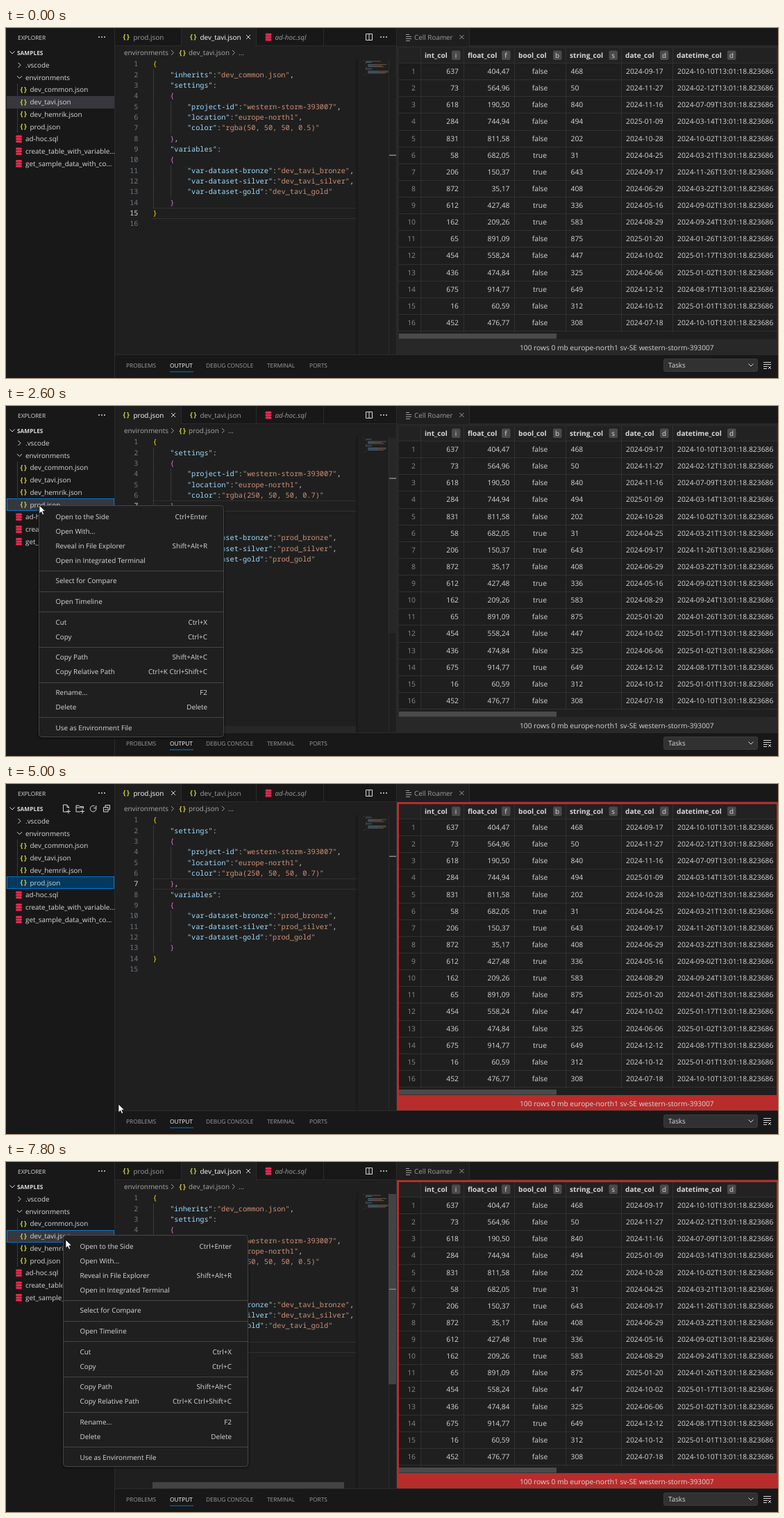
Write an HTML page that moves like this. It is 1112x504 px and loops after 8000 ms.

```html
<!DOCTYPE html>
<html lang="en">
<head>
<meta charset="utf-8">
<title>Environment switcher</title>
<style>
  html, body { margin: 0; width: 100%; height: 100%; overflow: hidden; background: #181818; }
  svg { display: block; font: 9.9px 'Open Sans', 'Noto Sans', sans-serif; text-rendering: geometricPrecision; }
  .code { font: 10.27px 'Noto Sans Mono', 'DejaVu Sans Mono', monospace; }
  .grid { font-size: 10.3px; }
  .head { font-size: 10.1px; font-weight: 700; }
  .caps { font-size: 8.35px; }
  .bold { font-weight: 700; }
  .end { text-anchor: end; }
  .mid { text-anchor: middle; }
</style>
</head>
<body>
<svg id="stage" width="1112" height="504" viewBox="0 0 1112 504"></svg>
<script>
const stage = document.getElementById('stage');
const LOOP = 8000, STEP = 200;
const FG = '#d8d8d8', DIM = '#9d9d9d', BLUE = '#0078d4', LINE = '#2b2b2b', EDITOR = '#1f1f1f';
const YELLOW = '#cbcb41', RED = '#f0284f';

// Drawing helpers; y is the vertical middle of a text line.
const text = (x, y, s, fill = FG, cls = '', extra = '') =>
  `<text x="${x}" y="${y + 3.6}" fill="${fill}" class="${cls}" ${extra}>${s}</text>`;
const rect = (x, y, w, h, fill, extra = '') =>
  `<rect x="${x}" y="${y}" width="${w}" height="${h}" fill="${fill}" ${extra}/>`;
const path = (d, stroke = FG, extra = '') => `<path d="${d}" fill="none" stroke="${stroke}" ${extra}/>`;
const group = (opacity, body) => opacity > 0 ? `<g opacity="${opacity}">${body}</g>` : '';
const right = (x, y, c) => path(`M${x - 2} ${y - 3.5}l3.5 3.5l-3.5 3.5`, c);
const down = (x, y, c) => path(`M${x - 3.5} ${y - 2}l3.5 3.5l3.5 -3.5`, c);
const cross = (x, y, c) => path(`M${x - 3} ${y - 3}l6 6m0 -6l-6 6`, c);
const braces = (x, y) => text(x, y - .5, '{}', YELLOW, 'bold', 'letter-spacing="1.6"');
const dots = (x, y) => [-4, 0, 4].map(d => `<circle cx="${x + d}" cy="${y}" r="1" fill="${FG}"/>`).join('');
const database = (x, y) => [-5.2, -1.5, 2.2].map(d => rect(x - 4.5, y + d, 9, 3.2, RED, 'rx="1.5"')).join('');

// Piecewise linear track of [time, ...values].
function track(keys, t) {
  if (t <= keys[0][0]) return keys[0].slice(1);
  const i = keys.findIndex(k => k[0] > t);
  if (i < 0) return keys[keys.length - 1].slice(1);
  const a = keys[i - 1], b = keys[i], f = (t - a[0]) / (b[0] - a[0]);
  return a.slice(1).map((v, j) => v + (b[j + 1] - v) * f);
}

const CURSOR = [[800, 6, 118], [1000, 30, 135], [1200, 48, 143], [2600, 48, 143], [2800, 70, 230],
  [3000, 100, 350], [3200, 130, 435], [3600, 162, 461], [5400, 162, 461], [5600, 190, 330],
  [5800, 140, 198], [6000, 106, 177], [6200, 92, 140], [6400, 86, 112], [6600, 84, 105],
  [7400, 84, 105], [7600, 86, 112]];
const SCROLLBARS = [[1400, 0], [1600, 1], [2000, 1], [2800, 0], [5400, 0], [5600, 1], [6800, 1], [7000, 0], [7200, 1]];
const FOLDS = [[5400, 0], [5600, 1], [6000, 1], [6400, 0]];

// Explorer
const FILES = ['.vscode', 'environments', 'dev_common.json', 'dev_tavi.json', 'dev_hemrik.json', 'prod.json',
  'ad-hoc.sql', 'create_table_with_variable...', 'get_sample_data_with_co...'];
const rowY = i => 53.4 + 17.72 * i;

const fileList = FILES.map((name, i) => {
  const y = rowY(i), nested = i > 1 && i < 6;
  const icon = i == 0 ? right(19.5, y) : i == 1 ? down(19.5, y) : nested ? braces(20.5, y) : database(18.5, y);
  return icon + text(nested ? 34.5 : 28, y, name);
}).join('') + rect(16, 80, 1, 71, '#3a3a3a');

const toolbar =
  path('M89 40h-6.500v-10h5l3 3v2M88 30v3.500h3M90 36.500v6m-3 -3h6') +
  path('M107 40h-6v-9h4l1.500 1.500h5v3M101 34h10M110 36.500v6m-3 -3h6') +
  path('M129.800 34.600A4.300 4.300 0 1 1 127.600 31.800M129.800 31v3.600h-3.600') +
  path('M140.500 33.500h6.500v6.500h-6.500zM143 33v-2.500h6.500v6.500h-2M142 36.800h3.500');

function explorer(t, dev, menu) {
  const focused = t >= 1400 && !menu, fill = focused ? '#04395e' : '#37373d';
  const top = Math.round(rowY(dev ? 3 : 5) - 8.9);
  const [hx, hy] = track(CURSOR, t - STEP);
  const hover = Math.round((hy - rowY(0)) / 17.72);
  let s = rect(0, 0, 156, 504, '#181818') + rect(156, 0, 1, 504, LINE);
  if (t >= 1000 && !menu && hx < 156 && hover < FILES.length) s += rect(0, rowY(hover) - 8.9, 156, 17.7, '#2a2d2e');
  s += rect(1.5, top + .5, 154, 17, fill, `stroke="${t >= 1400 ? BLUE : fill}"`);
  s += text(17, 13, 'EXPLORER', FG, 'caps') + dots(138, 13);
  s += down(9, 35.5) + text(16, 35, 'SAMPLES', FG, 'caps bold');
  return s + fileList + (t >= 800 && !menu ? toolbar : '');
}

// Editor
const source = (name, color, inherits) => [
  [0, '{'], ...inherits, [1, '"settings":'], [1, '{'],
  [2, '"project-id":"western-storm-393007",'], [2, '"location":"europe-north1",'], [2, `"color":"rgba(${color})"`],
  [1, '},'], [1, '"variables":'], [1, '{'],
  [2, `"var-dataset-bronze":"${name}_bronze",`], [2, `"var-dataset-silver":"${name}_silver",`],
  [2, `"var-dataset-gold":"${name}_gold"`], [1, '}'], [0, '}'], [0, '']];

const DOCS = {
  prod: { file: 'prod.json', lines: source('prod', '250, 50, 50, 0.7', []),
    line: 7, mark: 104, slider: 281, width: 293, crumb: 313 },
  dev: { file: 'dev_tavi.json', lines: source('dev_tavi', '50, 50, 50, 0.5', [[1, '"inherits":"dev_common.json",']]),
    line: 15, mark: 183, slider: 274, width: 276, crumb: 328 }
};
const lineY = i => 51.8 + 15.33 * i;
const paint = (s, depth) => s.replace(/"[^"]*"(?=:)|"[^"]*"|[{}]/g, (token, at) => {
  const isKey = s[at + token.length] == ':';
  const fill = token.length == 1 ? ['#ffd700', '#da70d6'][depth] : isKey ? '#9cdcfe' : '#ce9178';
  return `<tspan fill="${fill}">${token}</tspan>`;
});

function editorBody({ file, lines, line, mark, crumb }) {
  const ruleY = Math.round(lineY(line - 1) - 7.7);
  let s = text(170, 35.5, 'environments', '#a9a9a9') + right(240, 35.5, DIM) + braces(249.5, 35.5) +
    text(263, 35.5, file, '#a9a9a9') + right(crumb, 35.5, DIM) + text(crumb + 7, 35.5, '...', '#a9a9a9');
  s += rect(211, ruleY, 293, 1, '#303030') + rect(211, ruleY + 15, 293, 1, '#303030');
  lines.forEach(([depth, body], i) => {
    const y = lineY(i), active = i + 1 == line;
    s += text(190.5, y, i + 1, active ? FG : '#6e7681', 'code end');
    for (let d = 0; d < depth; d++) s += rect(212 + 25 * d, y - 7.7, 1, 15.4, '#3a3a3a');
    s += text(211.5 + 24.7 * depth, y, paint(body, depth), FG, 'code');
    const split = body.indexOf(':') + 1, mx = 515 + depth * 3.1, my = 46 + i * 1.55;
    s += rect(mx, my, (split || body.length) * .75, .9, '#7fb0c8', 'opacity=".55"');
    if (split) s += rect(mx + split * .75, my, (body.length - split) * .75, .9, '#ce9178', 'opacity=".5"');
  });
  return s + rect(504, 44, 3, 426, '#1a1a1a') + rect(551, 44, 1, 426, LINE) + rect(552, mark - .5, 11, 1.5, '#8a8a8a');
}

function tab(x, w, name, active, icon, extra = '') {
  return rect(x, 0, w, 26, active ? EDITOR : '#181818') + rect(x + w - 1, 0, 1, 26, LINE) +
    (active ? '' : rect(x, 25, w, 1, LINE)) + icon + text(x + 26.5, 13, name, active ? '#ffffff' : DIM, '', extra) +
    (active ? cross(x + w - 12, 13) : '');
}

function editor(t, dev) {
  const doc = dev ? DOCS.dev : DOCS.prod;
  let s = rect(157, 0, 406, 470, EDITOR) + rect(157, 0, 406, 26, '#181818') + rect(457, 25, 106, 1, LINE);
  s += tab(157, 96, 'prod.json', !dev, braces(168.5, 13));
  s += tab(253, 108, 'dev_tavi.json', dev, braces(265, 13));
  s += tab(361, 97, 'ad-hoc.sql', false, database(378, 13), 'font-style="italic"');
  s += path('M518.500 8.500h9v9h-9zM523 8.500v9') + dots(544, 13);
  s += editorBody(doc);
  const folds = doc.lines.map(([, body], i) => body == '{' ? down(203, lineY(i), DIM) : '').join('');
  s += group(track(FOLDS, t)[0], folds);
  return s + group(track(SCROLLBARS, t)[0], rect(551, 46, 12, doc.slider, '#797979', 'opacity=".4"') +
    rect(211, 461, doc.width, 9, '#797979', 'opacity=".4"'));
}

// Result table
const ROWS = `637 404,47 false 468 2024-09-17 2024-10-10
73 564,96 false 50 2024-11-27 2024-02-12
618 190,50 false 840 2024-11-16 2024-07-09
284 744,94 false 494 2025-01-09 2024-03-14
831 811,58 false 202 2024-10-28 2024-10-02
58 682,05 true 31 2024-04-25 2024-03-21
206 150,37 true 643 2024-09-17 2024-11-26
872 35,17 false 408 2024-06-29 2024-03-22
612 427,48 true 336 2024-05-16 2024-09-02
162 209,26 true 583 2024-08-29 2024-09-24
65 891,09 false 875 2025-01-20 2024-01-26
454 558,24 false 447 2024-10-02 2025-01-17
436 474,84 false 325 2024-06-06 2025-01-02
675 914,77 true 649 2024-12-12 2024-08-17
16 60,59 false 312 2024-10-12 2025-01-01
452 476,77 false 308 2024-07-18 2024-10-10`.split('\n').map(r => r.split(' '));

// Column: name, left edge, badge centre, cell x, alignment
const COLUMNS = [['int', 597, 648, 652, 'end'], ['float', 659, 720, 725.5, 'end'], ['bool', 732, 794, 769, 'mid'],
  ['string', 806, 874.5, 813.5, ''], ['date', 886, 948, 893, ''], ['datetime', 960, 1045, 967, '']];

const table = (() => {
  let s = rect(566, 29, 546, 21, '#222222') + rect(566, 50, 31, 388, '#1c1c1c');
  for (let i = 0; i <= 16; i++) s += rect(566, Math.round(50 + i * 24.13), 546, 1, '#303030');
  COLUMNS.forEach(([name, left, badge, x, align], c) => {
    s += rect(left, 29, 1, 409, '#303030') + text(left + 6, 39.5, name + '_col', FG, 'head');
    s += rect(badge - 6, 32.5, 12.5, 13.5, '#4a4a4a', 'rx="2"') + text(badge, 39, name[0], FG, 'mid');
    ROWS.forEach((row, i) =>
      s += text(x, 62.4 + i * 24.13, row[c] + (c == 5 ? 'T13:01:18.823686' : ''), FG, 'grid ' + align));
  });
  ROWS.forEach((_, i) => s += text(590, 62.4 + i * 24.13, i + 1, '#8a8a8a', 'grid end'));
  return s + rect(566, 440, 227, 7.5, '#4a4a4a');
})();

function results(t) {
  const tint = t >= 4400 ? 'rgba(250,50,50,.7)' : 'rgba(50,50,50,.5)';
  let s = rect(563, 0, 549, 470, EDITOR) + rect(668, 0, 444, 26, '#181818') + rect(668, 25, 444, 1, LINE) +
    rect(562, 0, 1, 470, LINE) + rect(667, 0, 1, 26, LINE);
  s += path('M576 9.500h5m-5 3h8m-8 3h8m-8 3h6', DIM) + text(588, 13, 'Cell Roamer', DIM) + cross(656.5, 13, DIM);
  s += table + rect(563, 26, 549, 3, tint) + rect(563, 29, 3, 419, tint) + rect(1110, 29, 2, 419, tint) +
    rect(563, 448, 549, 22, tint);
  return s + text(740, 460, '100 rows 0 mb europe-north1 sv-SE western-storm-393007', FG, '', 'font-size="10.2"');
}

const panel = rect(157, 470, 955, 34, '#181818') + rect(157, 470, 955, 1, LINE) +
  [['PROBLEMS', 173], ['OUTPUT', 236], ['DEBUG CONSOLE', 288], ['TERMINAL', 376], ['PORTS', 437]]
    .map(([name, x], i) => text(x, 485, name, i == 1 ? '#ffffff' : DIM, 'caps')).join('') +
  rect(236, 494.5, 34, 1, BLUE) +
  rect(947.5, 476.5, 135, 18, '#313131', 'stroke="#3c3c3c" rx="2"') + text(954, 485.5, 'Tasks') + down(1073, 485.5) +
  path('M1091 481.500h11m-11 3h11m-11 3h6m-6 3h5m2 -3.500l4 4m0 -4l-4 4');

// Context menu; an empty entry is a separator
const ITEMS = ['Open to the Side|Ctrl+Enter', 'Open With...|', 'Reveal in File Explorer|Shift+Alt+R',
  'Open in Integrated Terminal|', '', 'Select for Compare|', '', 'Open Timeline|', '', 'Cut|Ctrl+X', 'Copy|Ctrl+C', '',
  'Copy Path|Shift+Alt+C', 'Copy Relative Path|Ctrl+K Ctrl+Shift+C', '', 'Rename...|F2', 'Delete|Delete', '',
  'Use as Environment File|'];

function contextMenu(mx, my, [cx, cy]) {
  let s = rect(mx - 2, my, 271, 337, '#000', 'opacity=".25" rx="6"') +
    rect(mx + .5, my + .5, 266, 333, EDITOR, 'stroke="#454545" rx="4"');
  let y = my + 16;
  for (const item of ITEMS) {
    if (!item) {
      s += rect(mx + 1, Math.round(y - 6.2), 265, 1, '#454545');
      y += 8.7;
      continue;
    }
    const [label, keys] = item.split('|');
    const hover = cx > mx + 4 && Math.abs(cy - y) < 10;
    if (hover) s += rect(mx + 4, y - 10, 259, 20, BLUE, 'rx="3"');
    s += text(mx + 24.5, y, label, hover ? '#fff' : FG) + text(mx + 243, y, keys, hover ? '#fff' : FG, 'end');
    y += 21;
  }
  return s;
}

const ARROW = 'M0 0v12l2.800 -2.600l1.900 4.300l2 -.9l-1.900 -4.200h3.900z';
const HAND = 'M-1.300 1q1.300 -2 2.600 0v5l5 1.200q2 .5 1.800 2.500l-1 5v2h-6.500v-2l-4.500 -5.200q.5 -2 2.600 0z';
const pointer = ([x, y], hand) =>
  `<path d="${hand ? HAND : ARROW}" transform="translate(${x} ${y})" fill="#fff" stroke="#000" stroke-width=".7"/>`;

function scene(t) {
  const dev = t < 1400 || t >= 7000;
  const menu = t >= 2200 && t < 3800 ? [47, 143] : t >= 7600 ? [82, 105] : null;
  const cursor = track(CURSOR, t);
  return explorer(t, dev, menu) + editor(t, dev) + results(t) + panel +
    (menu ? contextMenu(...menu, cursor) : '') +
    (t >= 800 ? pointer(cursor, !menu && cursor[0] < 156) : '');
}

let shown = -1;
function tick() {
  const t = Math.floor(performance.now() % LOOP / STEP) * STEP;
  if (t != shown) stage.innerHTML = scene(shown = t);
  requestAnimationFrame(tick);
}
tick();
</script>
</body>
</html>
```
